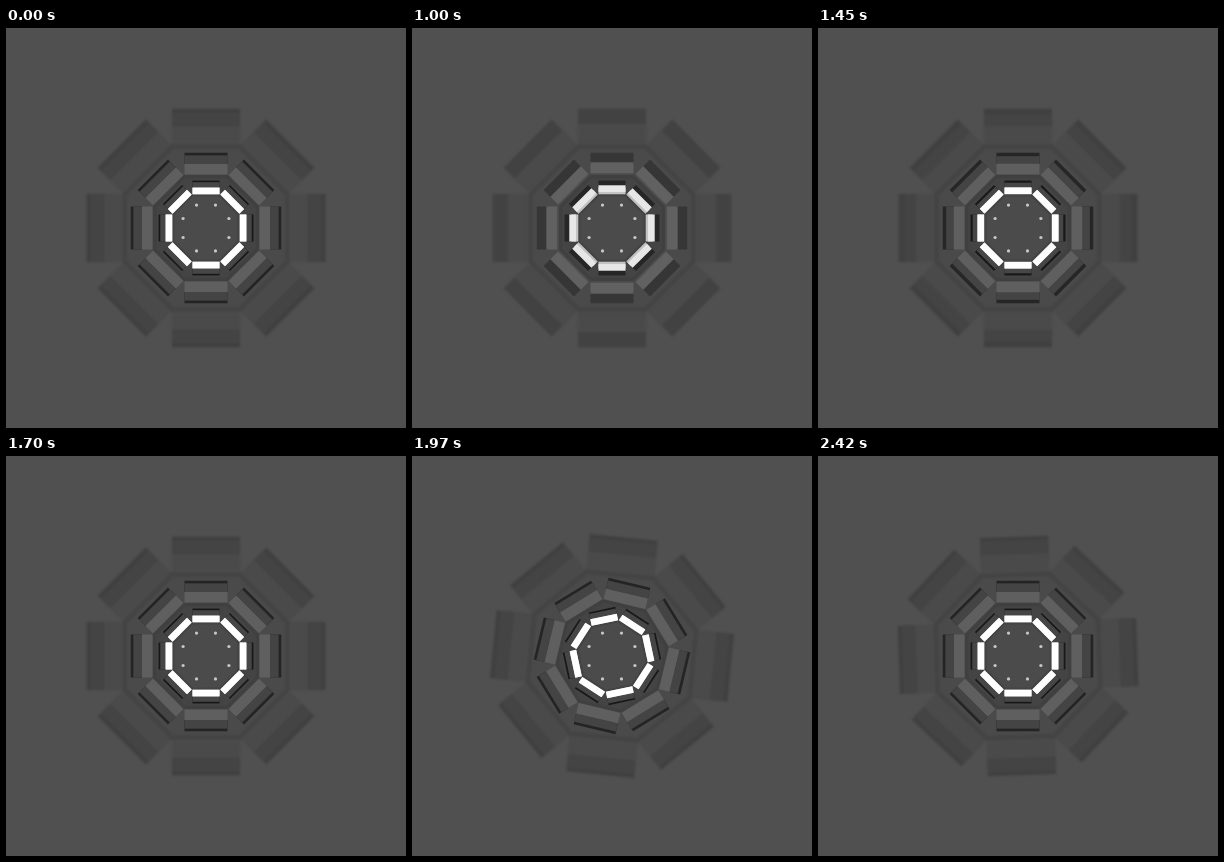
Animation of 400x400 px, one loop 3.03 s. Source, as an HTML page:

```html
<!DOCTYPE html>
<html lang="en">
<head>
<meta charset="utf-8">
<title>Octagon rings</title>
<style>
  html, body { margin: 0; width: 100%; height: 100%; overflow: hidden; background: #505050; }
  svg { display: block; width: 100vw; height: 100vh; }
</style>
</head>
<body>
<svg id="stage" viewBox="-200 -200 400 400"></svg>
<script>
const LOOP = 3030, HOLD = 2420, OPEN = 600, CLOSE = 1150, SLIDE = 550, SPIN = 1700;
// a: apothem; shift: how far the light slab slides; light and slot: greys [closed, open]
const rings = [
  { a: 84, blur: 1, fill: 74, edge: 68, shift: 0.03, light: [74, 74], back: 73, plate: 68, slot: [64, 66], spin: 900, pow: 2.7 },
  { a: 53, blur: 0.4, fill: 68, edge: 64, shift: 0.03, light: [95, 97], back: 80, plate: 68, slot: [36, 54], spin: 690, pow: 2.1 },
  { a: 33.4, blur: 0.3, fill: 75, edge: 68, shift: 0.07, light: [255, 230], back: 195, plate: 70, slot: [24, 38], spin: 437, pow: 2.3 }
];
const stage = document.getElementById('stage');
const grey = v => `rgb(${v},${v},${v})`;
const mix = (a, b, p) => a + (b - a) * p;
const clamp = p => Math.min(1, Math.max(0, p));
const easeOut = p => 1 - (1 - p) ** 3;
const easeInOut = (p, n) => p < 0.5 ? (2 * p) ** n / 2 : 1 - (2 - 2 * p) ** n / 2;

function add(parent, tag, attrs) {
  const el = document.createElementNS('http://www.w3.org/2000/svg', tag);
  for (const k in attrs) el.setAttribute(k, attrs[k]);
  return parent.appendChild(el);
}

function octagon(a) {
  const r = a / Math.cos(Math.PI / 8);
  return Array.from({ length: 8 }, (_, i) => {
    const t = (i + 0.5) * Math.PI / 4;
    return [r * Math.cos(t), r * Math.sin(t)].map(v => v.toFixed(2)).join();
  }).join(' ');
}

// Band of a panel between two distances from the centre
function band(parent, a, from, to, color) {
  return add(parent, 'rect', {
    x: -0.405 * a, y: -to * a, width: 0.81 * a, height: (to - from) * a, fill: grey(color)
  });
}

for (const r of rings) {
  const layer = add(stage, 'g', { style: `filter: blur(${r.blur}px)` });
  r.el = add(layer, 'g', {});
  add(r.el, 'polygon', {
    points: octagon(r.a * 0.97), fill: grey(r.fill), stroke: grey(r.edge), 'stroke-width': r.a * 0.06
  });
  r.panels = Array.from({ length: 8 }, (_, i) => {
    const g = add(r.el, 'g', { transform: `rotate(${i * 45})` });
    return {
      slot: band(g, r.a, 1.2, 1.42, r.slot[0]),
      plate: band(g, r.a, 1.21, 1.37, r.plate),
      back: band(g, r.a, 1.01, 1.21, r.back),
      light: band(g, r.a, 1.01, 1.21, r.light[0])
    };
  });
}

for (let i = 0; i < 8; i++) {
  const t = (i + 0.5) * Math.PI / 4;
  add(stage, 'circle', { cx: 24.8 * Math.cos(t), cy: 24.8 * Math.sin(t), r: 1.6, fill: '#c8c8c8' });
}

function draw(now) {
  const t = Math.min(now % LOOP, HOLD);
  const open = easeOut(clamp((t - OPEN) / SLIDE)) - easeOut(clamp((t - CLOSE) / SLIDE));
  for (const r of rings) {
    const turn = 45 * easeInOut(clamp((t - SPIN) / r.spin), r.pow);
    r.el.setAttribute('transform', `rotate(${turn})`);
    const top = mix(1.37, 1.21, open);
    for (const p of r.panels) {
      p.plate.setAttribute('y', -top * r.a);
      p.plate.setAttribute('height', Math.max(0, (top - 1.21) * r.a));
      p.slot.setAttribute('fill', grey(mix(...r.slot, open)));
      p.light.setAttribute('y', -(1.21 + r.shift * open) * r.a);
      p.light.setAttribute('fill', grey(mix(...r.light, open)));
    }
  }
}

let start;
function tick(now) {
  start ??= now;
  draw(now - start);
  requestAnimationFrame(tick);
}
draw(0);
requestAnimationFrame(tick);
</script>
</body>
</html>
```
